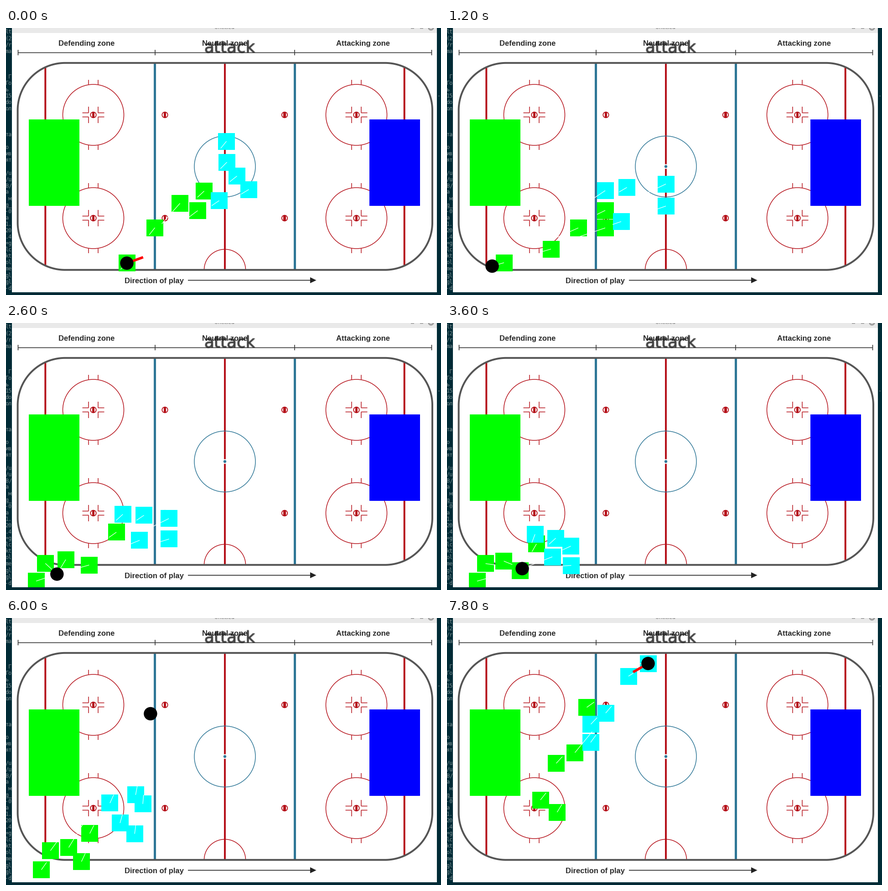
A matplotlib script that plays this animation: 954x587 px, repeating every 8000 ms.

```python
import numpy as np
import matplotlib.pyplot as plt
from matplotlib.animation import FuncAnimation
from matplotlib.collections import LineCollection
from matplotlib.patches import Arc, Circle, Polygon, Rectangle

W, H, DPI = 954, 587, 64
PT = 72 / DPI  # points per pixel
RED, BLUE, INK = "#b5121b", "#2f7797", "#2b2b2b"
GREEN, CYAN = "#00ff00", "#00ffff"
SIZE = 37

fig = plt.figure(figsize=(W / DPI, H / DPI), dpi=DPI, facecolor="#002b36")
ax = fig.add_axes([0, 0, 1, 1])
ax.set_xlim(0, W)
ax.set_ylim(H, 0)
ax.axis("off")


def rect(x0, y0, x1, y1, color, z=1):
    ax.add_patch(Rectangle((x0, y0), x1 - x0, y1 - y0, fc=color, lw=0, zorder=z))


def line(x0, y0, x1, y1, color, width, z=2):
    ax.plot([x0, x1], [y0, y1], color=color, lw=width * PT, zorder=z,
            solid_capstyle="butt", snap=False)


def ring(x, y, r, color, width=1.5, fill="none", z=2):
    ax.add_patch(Circle((x, y), r, fc=fill, ec=color, lw=width * PT, zorder=z))


def text(x, y, s, size, color=INK, font="Liberation Sans", ha="center", z=4, **kw):
    ax.text(x, y, s, size=size * PT, color=color, family=font, ha=ha,
            va="baseline", zorder=z, **kw)


def spot(x, y):
    ring(x, y, 6.2, RED, 1.8, "white", 3)
    rect(x - 2.7, y - 6, x + 2.7, y + 6, RED, 3)


def faceoff(x, y):
    ring(x, y, 67, RED)
    spot(x, y)
    for sx in (-1, 1):
        for sy in (-1, 1):
            px, py = x + 10.5 * sx, y + 4.5 * sy
            line(px, py, x + 24 * sx, py, RED, 1.5)
            line(px, py, px, y + 18 * sy, RED, 1.5)
            line(px, y + 67 * sy, px, y + 77 * sy, RED, 1.5)


def boards(cx, cy, half_w, half_h, r):
    a = np.linspace(0, 2 * np.pi, 402)[:-1] + 0.001
    c, s = np.cos(a), np.sin(a)
    xy = np.column_stack([cx + np.sign(c) * (half_w - r) + r * c,
                          cy + np.sign(s) * (half_h - r) + r * s])
    ax.add_patch(Polygon(xy, fc="none", ec="#555555", lw=4 * PT, zorder=3))


def draw_terminal():
    rows = ("lt|(2|/r|ma|||| Г|Го|ь|15|do|ол||||та||о|ив|ят||/u|/u|B/|а| м|"
            "g_|-0|а|1.|20|.4|+g|lc|kt|ol|me|gl|gl|-d").split("|")
    style = dict(size=11.7, color="#7b8c8f", font="DejaVu Sans Mono", ha="left", z=0)
    for i, row in enumerate(rows):
        text(-1.5, 12.5 + 14.08 * i, row, **style)
    text(946, 153, "-", **style)


def draw_window():
    rect(13, 0, 945, 581, "white")
    rect(13, 0, 945, 10.5, "#e9e9e9")
    rect(0, 581, W, H, "#002b36", 9)
    text(479, 2.5, "Untitled", 11, "#777777", "DejaVu Sans")
    for x in (888, 908):
        line(x, 1, x + 7, 1, "#999999", 1.5)
    ring(932, -1, 6, "#8c8c8c", 1, "#a0a0a0")
    for d in (-2.5, 2.5):
        line(932 - d, -3, 932 + d, 2, "white", 1.3, 3)


def draw_rink():
    for x in (86.3, 873.7):
        line(x, 87, x, 523, RED, 4)
    for x in (326.5, 633.5):
        line(x, 78, x, 531, BLUE, 5)
    line(480, 78, 480, 531, RED, 4)
    for y in (191, 418):
        for x in (191.5, 768.5):
            faceoff(x, y)
        for x in (348.5, 611):
            spot(x, y)
    ring(480, 304.5, 67, BLUE)
    ring(480, 304.5, 4.2, "white", 2, BLUE, 3)
    ax.add_patch(Arc((480, 532), 91, 91, theta1=180, theta2=360, color=RED,
                     lw=1.5 * PT, zorder=2))
    boards(480.3, 304.3, 454.7, 227.5, 104)
    rect(50, 201, 161, 391, GREEN, 4)
    rect(797, 201, 908, 391, "#0000ff", 4)


def draw_labels():
    line(26, 54.3, 934, 54.3, "#3a3a3a", 1.7)
    for x in (26.5, 327, 633, 933.5):
        line(x, 48, x, 60, "#3a3a3a", 1.7)
    for x, y, s in ((176.5, 39, "Defending zone"), (480, 39, "Neutral zone"),
                    (782.5, 39, "Attacking zone"), (325, 561, "Direction of play")):
        text(x, y, s, 16.6, weight="bold")
    line(399, 554.6, 669, 554.6, "#222222", 1.7)
    ax.add_patch(Polygon([(667, 548), (680.5, 554.6), (667, 561)], fc="#222222",
                         lw=0, zorder=2))
    # soft edges for the blurred caption
    for dx in (-1, 0, 1):
        for dy in (-1, 0, 1):
            text(491 + dx, 53.5 + dy, "attack", 35.7, "#222222", "DejaVu Sans",
                 alpha=0.22)


draw_terminal()
draw_window()
draw_rink()
draw_labels()

# Times are in tenths of a second; the scene moves only on these ticks.
TICKS = np.array([0, 1, *range(5, 28), *np.arange(33.4, 56, 1.545),
                  *np.arange(57.3, 78.1, 1.59)]).astype(int)

# Poses: faceoff, chase, scrum in the corner, counter-attack.
POSE_TIMES = [0, 12, 50, 77]
GREEN_POSES = np.array([
    [(265.5, 516.5), (326.5, 439), (381.5, 385.5), (420.5, 401.5), (434.5, 358.5)],
    [(125, 516), (228, 486), (288, 439.5), (347, 439.5), (347, 401)],
    [(66, 567.5), (84.5, 529), (124.5, 523.5), (158.5, 545.5), (172.5, 499)],
    [(205, 400), (239.5, 319.5), (280.5, 296), (241.5, 427), (306.5, 196.5)],
])
CYAN_POSES = np.array([
    [(484.5, 295), (483.5, 249), (506.5, 325.5), (532.5, 355), (467.5, 379.5)],
    [(347, 357.5), (394.5, 350.5), (480, 343), (480, 391.5), (382, 425.5)],
    [(193, 464.5), (238.5, 473), (271.5, 490.5), (272.5, 533), (231, 514)],
    [(348, 209), (441.5, 100), (398, 128), (315, 273.5), (315.5, 233.5)],
])
PUCK_STOPS = [(0, 265, 517), (12, 99, 523.5), (15, 32, 543), (19, 74.5, 560.5),
              (36, 165, 540), (45, 266, 530), (68, 344, 40), (77, 441, 100)]


def green_ease(leg, u):
    """The leaders reach the corner first; the way back starts slowly."""
    sharpness = 12 - 2.5 * np.arange(5)
    return [u, 1 - (1 - u) ** sharpness, u ** 2.5][leg]


def cyan_ease(leg, u):
    """Steady skating into the corner, then a wait and a quicker break."""
    return [u, min(1, 1.6 * u), u ** 1.5][leg]


def team_at(poses, ease, t):
    leg = min(int(np.searchsorted(POSE_TIMES, t, side="right")) - 1, 2)
    start, end = POSE_TIMES[leg:leg + 2]
    share = np.broadcast_to(ease(leg, (t - start) / (end - start)), 5)
    return poses[leg] + share[:, None] * (poses[leg + 1] - poses[leg])


def puck_at(t):
    times, xs, ys = zip(*PUCK_STOPS)
    return np.array([np.interp(t, times, xs), np.interp(t, times, ys)])


players = [Rectangle((0, 0), SIZE, SIZE, fc=color, lw=0, zorder=5)
           for color in [GREEN] * 5 + [CYAN] * 5]
for p in players:
    ax.add_patch(p)
marks = LineCollection([], colors="white", linewidths=1.2 * PT, zorder=6)
ax.add_collection(marks)
stick, = ax.plot([], [], color="#ff0000", lw=5.5 * PT, zorder=7,
                 solid_capstyle="butt")
puck = ax.add_patch(Circle((0, 0), 14.7, fc="black", lw=0, zorder=8))


def update(frame):
    t = int(TICKS[TICKS <= frame][-1])
    spots = np.vstack([team_at(GREEN_POSES, green_ease, t),
                       team_at(CYAN_POSES, cyan_ease, t)])
    target = puck_at(t)

    # every player looks towards the puck, a few of them further
    reach = np.where(np.random.default_rng(t).random(10) < 0.25, 60, 20)
    gaze = target - spots
    gaze *= (reach / (np.hypot(*gaze.T) + 1e-6))[:, None]
    for player, spot_xy in zip(players, spots):
        player.set_xy(spot_xy - SIZE / 2)
    marks.set_segments(np.stack([spots, spots + gaze], axis=1))

    puck.center = target
    carried = t <= 1 or t >= 77
    angle = np.radians(-20 if t <= 1 else 150)
    tip = target + 38 * np.array([np.cos(angle), np.sin(angle)])
    stick.set_data(*np.array([target, tip]).T)
    stick.set_visible(carried)
    return [*players, marks, stick, puck]


anim = FuncAnimation(fig, update, frames=80, interval=100, repeat=True, blit=False)
plt.show()
```
